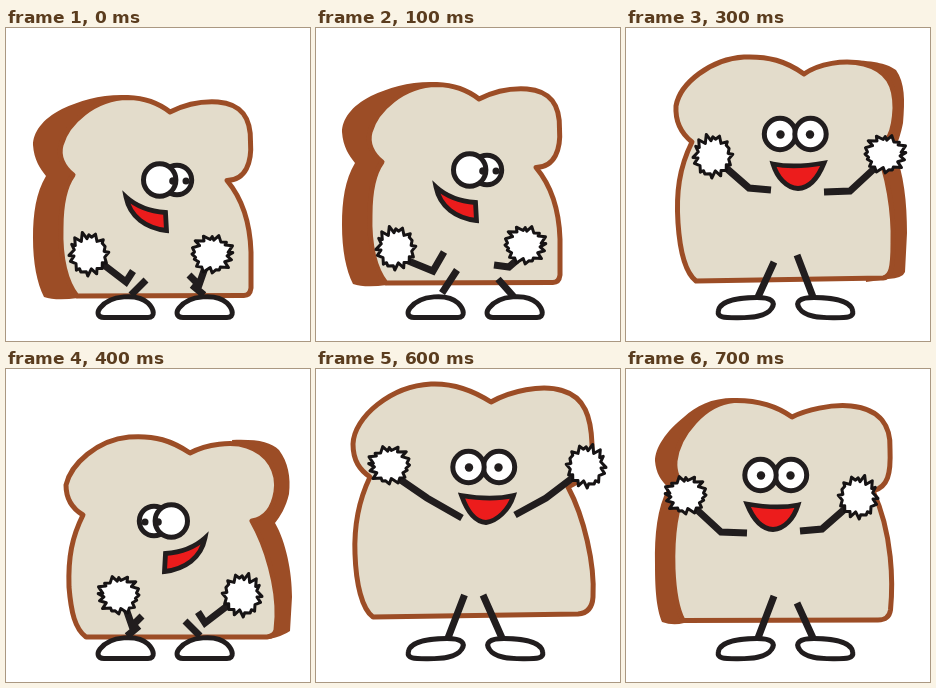
Animation, 304 px wide and 313 px high, one loop 0.8 s. Source, as an HTML page:

```html
<!DOCTYPE html>
<html lang="en">
<head>
<meta charset="utf-8">
<title>Dancing bread</title>
<style>
html, body { margin: 0; height: 100%; overflow: hidden; background: #fff; }
svg { display: block; width: 100%; height: 100%; }
.pose { visibility: hidden; animation: show 800ms step-end infinite; animation-delay: calc(var(--i) * 100ms - 800ms); }
@keyframes show {
  0% { visibility: visible; }
  12.5%, 100% { visibility: hidden; }
}
.flip { transform: matrix(-1, 0, 0, 1, 319, 0); }
.crust { fill: #9c4d26; }
.slice { fill: #e3dccb; stroke: #9c4d26; stroke-width: 5; stroke-linejoin: round; }
.eye, .foot { fill: #fff; stroke: #211d1e; stroke-width: 5; }
.pupil { fill: #211d1e; }
.mouth { fill: #ec1c1c; stroke: #211d1e; stroke-width: 4.8; }
.limb { fill: none; stroke: #211d1e; stroke-width: 7; }
.pom { fill: #fff; stroke: #161314; stroke-width: 3; stroke-linejoin: round; }
</style>
</head>
<body>
<svg viewBox="0 0 304 313">
  <defs>
    <path id="pomTall" class="pom"/>
    <path id="pomWide" class="pom"/>

    <g id="wideEyes">
      <circle class="eye" cx="136" cy="98" r="15.7"/>
      <circle class="eye" cx="166.5" cy="98" r="15.7"/>
      <circle class="pupil" cx="136.5" cy="98.5" r="4.2"/>
      <circle class="pupil" cx="166" cy="98.5" r="4.2"/>
    </g>
    <g id="sideFace">
      <circle class="eye" cx="171" cy="152" r="14.7"/>
      <circle class="eye" cx="153.7" cy="152" r="16.2"/>
      <circle class="pupil" cx="167" cy="153" r="3.8"/>
      <circle class="pupil" cx="180" cy="153" r="3.5"/>
      <path class="mouth" d="M120 169C131 179 146 183.500 159.500 184.500L160.500 202.500C140 200 124 189 120 169Z"/>
    </g>

    <path id="dome" class="foot" d="M98 289.500C91 289.500 91 284 94 280C104 266.500 132 265.500 142 275C148 281 150 289.500 142 289.500Z"/>
    <g id="domes"><use href="#dome"/><use href="#dome" x="79"/></g>
    <path id="oval" class="foot" d="M92.300 283C94 272 115 269.500 131 269.500C146 269.500 150 274 145.500 280.500C140 289 125 289.700 112 289.700C99 289.700 91 290 92.300 283Z"/>
    <g id="ovals"><use href="#oval"/><use href="#oval" class="flip"/></g>

    <g id="low">
      <use href="#sideFace"/>
      <path class="limb" d="M94 234L120 254L127 243M140 252L125 267M201 234L193 257L183 247M186 257L198 267"/>
      <use href="#pomTall" x="83" y="226"/>
      <use href="#pomWide" x="206" y="226"/>
    </g>
    <g id="rise">
      <use href="#sideFace" y="-10"/>
      <path class="limb" d="M128 224L117 243L90 232M141 242L126 265M201 232L193 239L178 237M182 251L198 269"/>
      <use href="#pomTall" x="80" y="220"/>
      <use href="#pomWide" x="209" y="217"/>
    </g>
    <g id="up">
      <use href="#wideEyes"/>
      <path class="mouth" d="M121.500 126.500C138 130.500 156 129.500 173.500 126.500C168 142 160 153 149 153.500C138 152 126 141 121.500 126.500Z"/>
      <path class="limb" d="M60 107L89 129L120 146M240 107L208 129L173 149M152 226L133 269M170.500 226L187 269"/>
      <use href="#pomTall" x="49" y="97"/>
      <use href="#pomWide" x="245.500" y="96"/>
    </g>
    <g id="mid">
      <use href="#wideEyes" x="18" y="8"/>
      <path class="mouth" d="M147 136C162 139 181 138 198 135C192 150 183 160 172 160.500C160 160 151 149 147 136Z"/>
      <path class="limb" d="M99 139L123 160L145 162M250 139L224 163L198 164M148 234L132 269M171 227L187 269"/>
      <use href="#pomTall" x="87" y="128"/>
      <use href="#pomWide" x="259" y="126"/>
    </g>

    <g id="breadLeft">
      <path class="crust" d="M122 67C95 66 75 72 56 81C36 91 27 105 27 117C28 132 34 140 40 148C30 165 27 185 27 210C27 235 31 255 38 269Q50 273 72 270L100 200Z"/>
      <path class="slice" d="M164 84C180 76 197 73 212 74C236 76 245 90 244.500 114C246 134 240 152 221 152.500C234 168 244 192 245 224L245 260Q244 268 237 267.500L71 268C60 255 54 230 55 200C55 175 59 158 67 147C57 139 52 128 55 117C61 95 88 70 122 69.500C140 70 155 77 164 84Z"/>
    </g>
    <g id="breadRight">
      <path class="crust" d="M225 58C250 57 264 60 272 68C281 80 284 95 282 112C279 125 273 135 268 141C279 160 285 190 285 215L283 249Q276 254 262 257L245 257Z"/>
      <path class="slice" d="M183 71C165 59 148 53 122 55C90 58 64 82 59 103C59 118 66 127 76 133C65 155 61 175 62 205C64 230 68 247 79 255L260 255Q268 254 269 248L270 235C271 205 260 165 245 139C258 137 266 128 269 110C272 90 262 71 240 64C225 59 200 62 183 71Z"/>
    </g>
    <g id="breadTurnRight">
      <path class="crust" d="M225 32C250 33 262 36 270 42C279 55 279 72 277 95C275 105 272 115 268 122C278 145 281 175 281 205L279 244Q277 250 262 251L240 254Z"/>
      <path class="slice" d="M178 46C160 33 142 28 118 29C85 31 54 55 50 78C49 95 56 106 66 114C53 140 50 165 52 195C54 225 60 245 70 253L257 250C265 249 267 240 267 215C268 185 262 145 250 120C262 115 268 105 269 80C269 58 262 42 238 36C218 31 192 36 178 46Z"/>
    </g>
    <g id="breadTurnLeft">
      <path class="crust" d="M108 29C85 29 70 37 58 48C40 62 29 79 29 92C30 104 35 112 42 118C31 140 28.500 165 29 195C29 225 31 240 36 253Q47 257 58 254Z"/>
      <path class="slice" d="M166 48C152 38 132 31 108 31.500C78 34 52 66 49 92C48 104 52 112 60 118C49 140 46 170 47 200C48 225 51 240 57 251.500L252 251Q263 251 264.500 241C267 215 267 165 247 122C262 118 265 105 264 80C265 58 255 40 225 37C205 35 180 41 166 48Z"/>
    </g>
    <path id="breadFrontA" class="slice" d="M171 31C156 20 141 13 120 13C80 13 35 40 32 72C31 88 37 98 47 106C36 135 34 165 35 195C36 222 44 240 55 246L258 243Q272 242 273 228C275 195 265 150 247 116C265 110 272 95 270 68C270 45 262 24 235 18C215 13 190 20 171 31Z"/>
    <path id="breadFrontB" class="slice" d="M175 33C158 22 138 14 115 15C75 17 38 48 37 75C37 92 44 101 54 108C41 135 38 160 39 185C40 215 46 240 57 248L262 245Q276 244 277 228C279 195 268 148 252 118C270 110 277 98 276 75C275 48 269 28 246 21.500C226 15 194 22 175 33Z"/>
  </defs>

  <g class="pose" style="--i:0">
    <use href="#breadLeft"/><use href="#low"/><use href="#domes"/>
  </g>
  <g class="pose" style="--i:1">
    <use href="#breadLeft" x="-1" y="-13"/><use href="#rise"/><use href="#domes"/>
  </g>
  <g class="pose" style="--i:2">
    <use href="#breadFrontA"/><use href="#up"/><use href="#ovals"/>
  </g>
  <g class="pose" style="--i:3">
    <use href="#breadTurnRight"/><use href="#mid"/><use href="#ovals"/>
  </g>
  <g class="pose" style="--i:4">
    <use href="#breadRight" x="1" y="13"/><use href="#low" class="flip"/><use href="#domes"/>
  </g>
  <g class="pose" style="--i:5">
    <use href="#breadRight"/><use href="#rise" class="flip"/><use href="#domes"/>
  </g>
  <g class="pose" style="--i:6">
    <use href="#breadFrontB"/><use href="#up" class="flip"/><use href="#ovals"/>
  </g>
  <g class="pose" style="--i:7">
    <use href="#breadTurnLeft"/><use href="#mid" class="flip"/><use href="#ovals"/>
  </g>
</svg>
<script>
// Ragged pom-pom outline: alternating long and short radii with seeded jitter.
function pomPath(rx, ry, seed) {
  const rand = () => (seed = (seed * 16807) % 2147483647) / 2147483647;
  const spikes = 16;
  const points = [];
  for (let k = 0; k < spikes * 2; k++) {
    const angle = (k + (rand() - 0.5) * 0.9) * Math.PI / spikes;
    const r = k % 2 ? 0.66 + rand() * 0.16 : 0.84 + rand() * 0.18;
    points.push((Math.cos(angle) * rx * r).toFixed(1) + ' ' + (Math.sin(angle) * ry * r).toFixed(1));
  }
  return 'M' + points.join('L') + 'Z';
}
document.getElementById('pomTall').setAttribute('d', pomPath(20, 22.5, 4127));
document.getElementById('pomWide').setAttribute('d', pomPath(22, 20, 9173));
</script>
</body>
</html>
```
